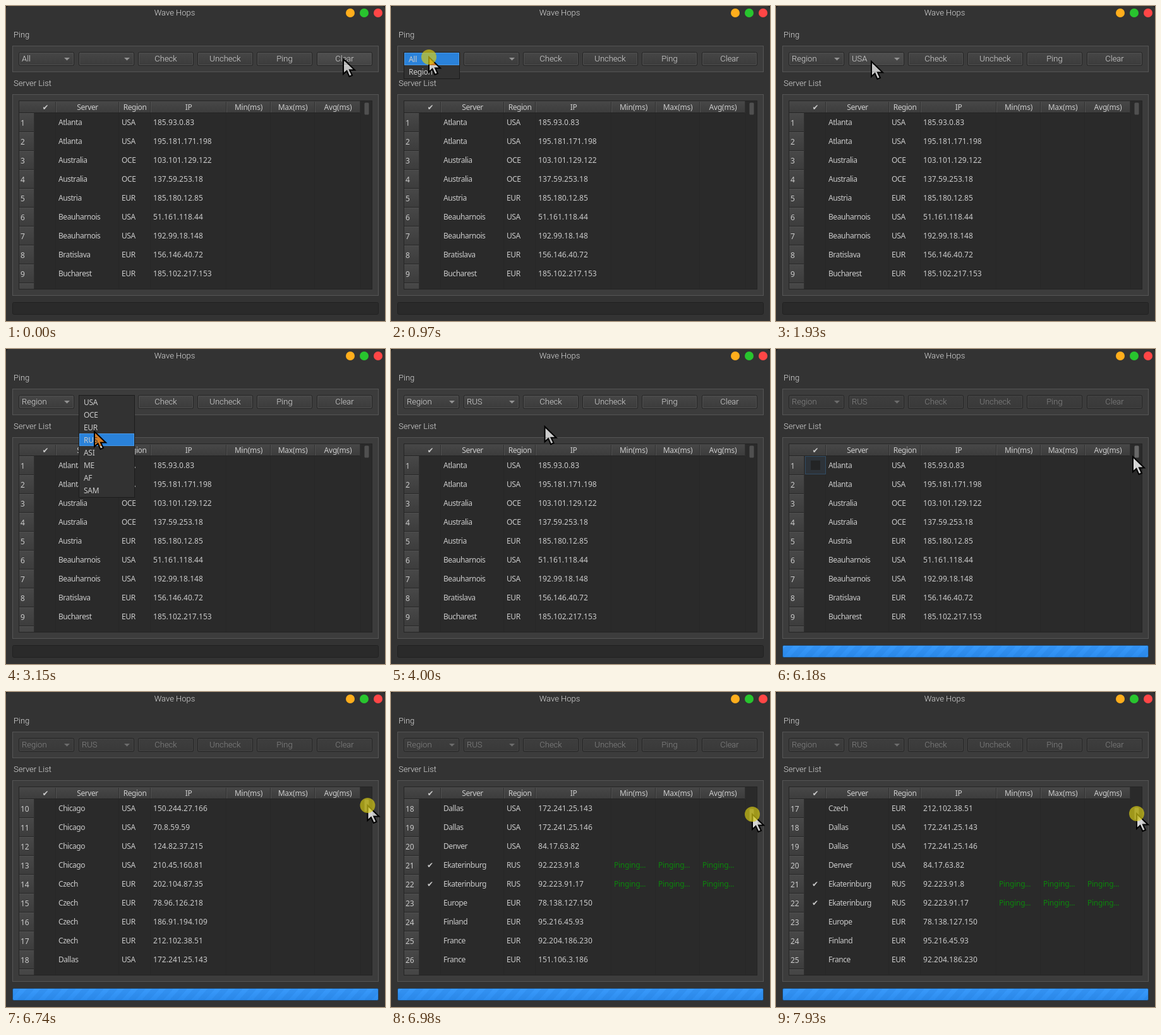
These frames come from a looping animation (600x500 px, 8 s). An HTML page with a canvas:

```html
<!DOCTYPE html>
<html lang="en">
<head>
<meta charset="utf-8">
<title>Wave Hops</title>
<style>
html, body { margin: 0; width: 100%; height: 100%; overflow: hidden; background: #333; }
canvas { display: block; }
</style>
</head>
<body>
<canvas id="stage" width="600" height="500"></canvas>
<script>
const ctx = document.getElementById('stage').getContext('2d');
const LOOP = 8000;
const UI = '300 13px Roboto, sans-serif';
const CELL = '12px "Noto Sans", sans-serif';
const ROW = 30, ITEM = 20, GRIP = 162, ROW_DRAG = 1.88;

const regions = ['USA', 'OCE', 'EUR', 'RUS', 'ASI', 'ME', 'AF', 'SAM'];
const headers = ['✔', 'Server', 'Region', 'IP', 'Min(ms)', 'Max(ms)', 'Avg(ms)'];
const edges = [45, 78, 178, 228, 348, 418, 488, 561];

let seed = 7;
function randomByte() {
  seed = seed * 16807 % 2147483647;
  return 1 + seed % 250;
}
const randomIp = () => Array.from({ length: 4 }, randomByte).join('.');

// City, region, addresses; "?" stands for any address
const servers = `Atlanta USA 185.93.0.83 195.181.171.198
Australia OCE 103.101.129.122 137.59.253.18
Austria EUR 185.180.12.85
Beauharnois USA 51.161.118.44 192.99.18.148
Bratislava EUR 156.146.40.72
Bucharest EUR 185.102.217.153
Chicago USA ? ? ? ?
Czech EUR ? ? ? 212.102.38.51
Dallas USA 172.241.25.143 172.241.25.146
Denver USA 84.17.63.82
Ekaterinburg RUS 92.223.91.8 92.223.91.17
Europe EUR 78.138.127.150
Finland EUR 95.216.45.93
France EUR 92.204.186.230 151.106.3.186`.split('\n').flatMap(line => {
  const [city, region, ...ips] = line.split(' ');
  return ips.map(ip => ({ city, region, ip: ip === '?' ? randomIp() : ip }));
});

// Moments of the mouse presses
const press = { filter: 930, byRegion: 1690, region: 1990, rus: 3640, ping: 5200, scroll: 6460 };
const busyFrom = press.ping + 100;

// Pointer moves: start, end, x, y; it rests in between
const moves = [
  [160, 640, 34, 303], [790, 930, 60, 81],
  [1250, 1290, 111, 393], [1430, 1560, 430, 250], [1560, 1690, 45, 104],
  [1760, 1920, 151, 88], [2080, 2230, 150, 102], [2330, 2810, 185, 158],
  [3050, 3150, 140, 131], [3150, 3260, 140, 106], [3260, 3440, 150, 146],
  [3720, 4410, 408, 83], [4430, 4570, 459, 83], [4760, 5070, 438, 84],
  [5300, 5500, 470, 150], [5600, 6180, 565, 171], [6180, 6360, 573, 162],
  [6460, 6980, 572, 194], [7400, 7800, 571, 193]
];

const within = (t, a, b) => t >= a && t < b;
const clamp = (v, a, b) => Math.min(b, Math.max(a, v));
const progressOf = (t, a, b) => clamp((t - a) / (b - a), 0, 1);
const ease = k => k * k * (3 - 2 * k);

function pointer(t) {
  let x = 534, y = 84;
  for (const [from, to, tx, ty] of moves) {
    const e = ease(progressOf(t, from, to));
    x += (tx - x) * e;
    y += (ty - y) * e;
  }
  const swing = 186 * Math.sin(Math.PI * progressOf(t, 7400, 7800));
  return [x, y - swing];
}

function rect(x, y, w, h, color) {
  ctx.fillStyle = color;
  ctx.fillRect(x, y, w, h);
}

function frame(x, y, w, h, color) {
  ctx.strokeStyle = color;
  ctx.lineWidth = 1;
  ctx.strokeRect(x + .5, y + .5, w - 1, h - 1);
}

function shade(y, h, from, to) {
  const g = ctx.createLinearGradient(0, y, 0, y + h);
  g.addColorStop(0, from);
  g.addColorStop(1, to);
  return g;
}

function text(s, x, y, { font = CELL, color = '#cbcbcb', align = 'left', gap = 0 } = {}) {
  ctx.font = font;
  ctx.fillStyle = color;
  ctx.textAlign = align;
  ctx.letterSpacing = gap + 'px';
  ctx.fillText(s, x, y);
}

const label = (s, x, y, align, color = '#dadada') => text(s, x, y, { font: UI, color, align });

function tick(x, y) {
  text('✔', x, y, { font: '12px "DejaVu Sans", sans-serif', align: 'center' });
}

function disc(x, y, r, color) {
  ctx.fillStyle = color;
  ctx.beginPath();
  ctx.arc(x, y, r, 0, 7);
  ctx.fill();
}

function roundBox(x, y, w, h, r, fill, stroke) {
  ctx.beginPath();
  ctx.roundRect(x + .5, y + .5, w - 1, h - 1, r);
  ctx.fillStyle = fill;
  ctx.fill();
  if (stroke) {
    ctx.strokeStyle = stroke;
    ctx.lineWidth = 1;
    ctx.stroke();
  }
}

const slot = i => Math.round(20.2 + i * 94.3);

function control(i, name, s) {
  const x = slot(i), w = 88, combo = i < 2;
  const [mx, my] = s.mouse;
  const hot = !s.busy && !s.popup && within(mx, x, x + w) && within(my, 73, 95);
  const top = s.busy ? '#3e3e3e' : hot ? '#505050' : '#474747';
  const bottom = s.busy ? '#393939' : hot ? '#434343' : '#3b3b3b';
  roundBox(x, 73, w, 22, 2, shade(73, 22, top, bottom), '#242424');
  ctx.beginPath();
  ctx.roundRect(x + 1.5, 74.5, w - 3, 19, 1.5);
  ctx.strokeStyle = s.busy ? '#444' : '#505050';
  ctx.stroke();
  label(name, combo ? x + 5 : x + w / 2, 88, combo ? 'left' : 'center', s.busy ? '#858585' : '#dadada');
  if (combo) {
    ctx.fillStyle = s.busy ? '#6c6c6c' : '#929292';
    ctx.beginPath();
    ctx.moveTo(x + w - 16, 82);
    ctx.lineTo(x + w - 7, 82);
    ctx.lineTo(x + w - 11.5, 86.5);
    ctx.fill();
  }
}

function tableHeader() {
  rect(20, 150, 541, 20, shade(150, 20, '#484848', '#3c3c3c'));
  rect(20, 169, 541, 1, '#242424');
  headers.forEach((name, i) => {
    const mid = (edges[i] + edges[i + 1]) / 2;
    if (i) {
      rect(edges[i], 152, 1, 17, '#303030');
      rect(edges[i] + 1, 152, 1, 17, '#515151');
      text(name, mid + 1, 165, { align: 'center', gap: i > 3 ? -.2 : -.45 });
    } else tick(mid + 1, 165);
  });
  rect(560, 150, 1, 20, '#303030');
}

function rowHeader(y) {
  rect(20, y, 25, ROW, shade(y, ROW, '#484848', '#3c3c3c'));
  rect(20, y, 25, 1, '#505050');
  rect(20, y + ROW - 1, 25, 1, '#282828');
  rect(44, y, 1, ROW, '#303030');
}

function tableRow(n, y, busy) {
  const { city, region, ip } = servers[n], base = y + 19;
  text(n + 1, 23, y + 20);
  if (busy && n === 0) {
    rect(46, y, 33, 29, '#2d3339');
    frame(46, y, 33, 29, '#314c64');
    rect(55, y + 7, 15, 15, '#232425');
  }
  text(city, 83, base, { gap: -.45 });
  text(region, 183, base, { gap: -.4 });
  text(ip, 233, base, { gap: .05 });
  if (busy && region === 'RUS') {
    tick(62, base);
    for (const x of edges.slice(4, 7)) text('Pinging...', x + 5, base, { color: '#0c860c', gap: -.25 });
  }
}

function table(s) {
  rect(20, 150, 560, 300, '#2a2a2a');
  ctx.save();
  ctx.beginPath();
  ctx.rect(20, 150, 560, 300);
  ctx.clip();
  for (const x of edges.slice(1)) rect(x, 170, 1, 280, '#272727');
  tableHeader();
  for (let i = 0; i < 10; i++) {
    const y = 170 + i * ROW;
    rowHeader(y);
    if (i < 9) tableRow(s.offset + i, y, s.busy);
  }
  ctx.restore();
  frame(20, 150, 560, 300, '#252525');
  const hot = s.drag || (s.mouse[0] > 562 && within(s.mouse[1], 150, 450));
  roundBox(567, 153 + s.offset * ROW_DRAG, 8, 20, 1.5, hot ? '#686868' : '#505050');
}

function progress(s) {
  roundBox(10, 470, 580, 20, 2, '#2a2a2a', '#212121');
  if (!s.busy) return;
  ctx.save();
  roundBox(10, 470, 580, 20, 2, shade(470, 20, '#3a9bfd', '#2c8cee'), '#1f4468');
  ctx.beginPath();
  ctx.rect(11, 471, 578, 18);
  ctx.clip();
  const step = Math.floor((s.t - busyFrom) / 33) % 22;
  ctx.strokeStyle = 'rgba(25,105,195,.17)';
  ctx.lineWidth = 9;
  ctx.beginPath();
  for (let x = step - 44; x < 600; x += 22) {
    ctx.moveTo(x, 491);
    ctx.lineTo(x + 20, 469);
  }
  ctx.stroke();
  ctx.restore();
}

function popup(i, items, active) {
  const x = slot(i), w = 89, h = items.length * ITEM + 3;
  rect(x, 73, w, h, '#323232');
  frame(x, 73, w, h, '#1c1c1c');
  items.forEach((item, k) => {
    const y = 74 + k * ITEM;
    if (k === active) {
      rect(x + 1, y, w - 2, ITEM, '#2a82da');
      frame(x + 1, y, w - 2, ITEM, '#4a98e4');
    }
    text(item, x + 8, y + 15, { gap: -.3 });
  });
}

// The arrow inverts what lies beneath it
function cursor([x, y], pressed) {
  ctx.save();
  ctx.translate(x, y);
  const arrow = new Path2D('M0 0V24L5.5 19L9.5 28L14 26L10 17.5H18Z');
  ctx.globalCompositeOperation = 'difference';
  ctx.fillStyle = '#fff';
  ctx.fill(arrow);
  ctx.globalCompositeOperation = 'source-over';
  ctx.strokeStyle = '#000';
  ctx.lineWidth = 2;
  ctx.stroke(arrow);
  ctx.restore();
  if (pressed) disc(x, y, 12, 'rgba(215,203,20,.68)');
}

function draw(t) {
  const mouse = pointer(t), drag = t >= press.scroll;
  const byRegion = t >= press.byRegion + 50, rus = t >= press.rus + 50;
  const filterOpen = t >= press.filter + 30 && !byRegion;
  const regionOpen = t >= press.region + 40 && !rus;
  const s = {
    t, mouse, drag,
    busy: t >= busyFrom,
    popup: filterOpen || regionOpen,
    offset: drag ? clamp(Math.floor((mouse[1] - GRIP) / ROW_DRAG), 0, 17) : 0
  };

  rect(0, 0, 600, 500, '#1c1c1c');
  ctx.beginPath();
  ctx.roundRect(0, 0, 600, 500, [5, 5, 0, 0]);
  ctx.fillStyle = '#333';
  ctx.fill();
  label('Wave Hops', 267, 15, 'center');
  ['#ffae1c', '#28c52e', '#ff4646'].forEach((c, i) => disc(545 + i * 22, 11, 7, c));
  label('Ping', 12, 50, 'left');
  label('Server List', 12, 127, 'left');
  for (const [y, h] of [[63, 42], [140, 320]]) {
    rect(10, y, 580, h, '#3c3c3c');
    frame(10, y, 580, h, '#555');
  }

  const filter = byRegion ? 'Region' : 'All';
  const region = rus ? 'RUS' : byRegion ? 'USA' : '';
  [filter, region, 'Check', 'Uncheck', 'Ping', 'Clear'].forEach((name, i) => control(i, name, s));
  table(s);
  progress(s);

  // The highlighted entry trails the pointer slightly
  const active = Math.floor((pointer(t - 60)[1] - 74) / ITEM);
  if (filterOpen) popup(0, ['All', 'Region'], clamp(active, 0, 1));
  if (regionOpen) popup(1, regions, active);
  cursor(mouse, drag || Object.values(press).some(p => within(t, p, p + 70)));
}

const start = performance.now();
function play() {
  draw((performance.now() - start) % LOOP);
  requestAnimationFrame(play);
}
play();
</script>
</body>
</html>
```
